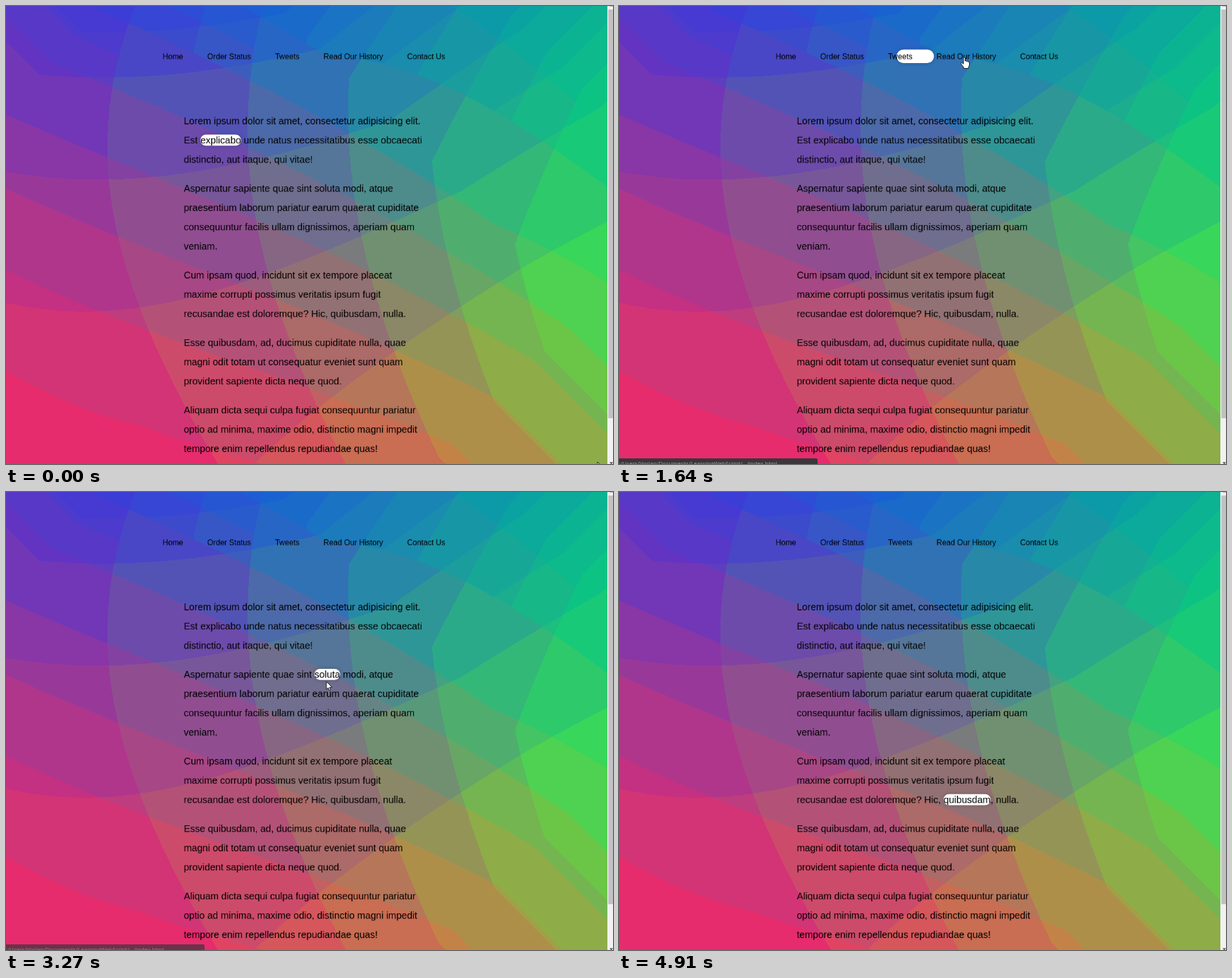
An HTML page with a canvas that plays this animation: 862x650 px, repeating every 5.16 s.

```html
<!DOCTYPE html>
<html lang="en">
<head>
<meta charset="utf-8">
<title>Follow along links</title>
<style>
html, body { margin: 0; width: 100%; height: 100%; overflow: hidden; }
canvas { display: block; }
</style>
</head>
<body>
<canvas id="stage" width="862" height="650"></canvas>
<script>
const ctx = document.getElementById('stage').getContext('2d');
const LOOP = 5160;
const VIEW_W = 854, VIEW_H = 650;
const ZOOM = 0.684;
const ORIGIN = { x: -7.6, y: -6.6 };       // page corner on the stage
const PAGE_W = 1260, PAGE_H = 1061;        // in page pixels
const MIDDLE = 629.7;
const FAMILY = '"Liberation Sans", Arial, sans-serif';
const STATUS = ':/Users/Vorlan/Documents/LearningWebScript/.../index.html';

const NAV = ['Home', 'Order Status', 'Tweets', 'Read Our History', 'Contact Us'];
// Square brackets mark links.
const PARAGRAPHS = [
  ['Lorem ipsum dolor sit amet, [consectetur] adipisicing elit.',
   'Est [explicabo] unde natus necessitatibus esse obcaecati',
   'distinctio, aut itaque, qui vitae!'],
  ['Aspernatur sapiente quae sint [soluta] modi, atque',
   'praesentium laborum pariatur earum [quaerat] cupiditate',
   'consequuntur facilis ullam dignissimos, aperiam quam',
   'veniam.'],
  ['Cum ipsam quod, incidunt sit ex [tempore] placeat',
   'maxime corrupti possimus veritatis ipsum fugit',
   'recusandae est doloremque? Hic, [quibusdam], nulla.'],
  ['Esse quibusdam, ad, ducimus cupiditate nulla, quae',
   'magni odit totam ut consequatur eveniet sunt quam',
   'provident sapiente dicta neque quod.'],
  ['Aliquam dicta sequi culpa fugiat [consequuntur] pariatur',
   'optio ad minima, maxime odio, distinctio magni impedit',
   'tempore enim repellendus repudiandae quas!']
];

// Pointer moves: start, end, x, y
const MOVES = [
  [30, 530, 262, 101], [610, 760, 238, 76], [850, 1180, 318, 73],
  [1230, 1480, 400, 73], [1557, 1657, 497, 73], [1740, 2220, 500, 79],
  [2270, 2400, 470, 160], [2420, 2650, 309, 196], [2810, 3080, 455, 260],
  [3200, 3270, 455, 269], [3570, 3690, 495, 284], [3690, 3800, 478, 380],
  [3800, 3960, 510, 434], [4410, 4910, 864, 656]
];
// Spans in which the status bar is wanted
const STATUS_SPANS = [[800, 2290], [2460, 3220], [4080, 4480]];

const clamp = v => Math.max(0, Math.min(1, v));
const mix = (a, b, k) => a + (b - a) * k;
const smooth = k => k * k * (3 - 2 * k);

function makeCanvas(w, h) {
  const c = document.createElement('canvas');
  c.width = w;
  c.height = h;
  return c;
}

const links = {};

function addLink(name, x, y, w, h) {
  links[name] = [x * ZOOM + ORIGIN.x, y * ZOOM + ORIGIN.y, w * ZOOM, h * ZOOM];
}

// Lays the page out at full size, then shrinks its text to the stage.
function makeText() {
  const page = makeCanvas(PAGE_W, PAGE_H), p = page.getContext('2d');
  p.font = '16px ' + FAMILY;
  const widths = NAV.map(s => p.measureText(s).width);
  let x = MIDDLE - (widths.reduce((a, b) => a + b) + 50 * (NAV.length - 1)) / 2;
  NAV.forEach((name, i) => {
    p.fillText(name, x, 120);
    addLink(name, x - 5, 100, widths[i] + 10, 28);
    x += widths[i] + 50;
  });

  p.font = '20px ' + FAMILY;
  const left = MIDDLE - 249.5;
  let mid = 248;
  for (const lines of PARAGRAPHS) {
    for (const line of lines) {
      const [before, link] = line.split(/[\[\]]/);
      if (link) {
        addLink(link, left + p.measureText(before).width, mid - 11.5, p.measureText(link).width, 23);
      }
      p.fillText(line.replace(/[\[\]]/g, ''), left, mid + 7);
      mid += 40;
    }
    mid += 20;
  }

  const layer = makeCanvas(VIEW_W, VIEW_H), c = layer.getContext('2d');
  c.imageSmoothingQuality = 'high';
  c.drawImage(page, ORIGIN.x, ORIGIN.y, PAGE_W * ZOOM, PAGE_H * ZOOM);
  return layer;
}

// Stacked corner gradients, reduced to colour cells that take their mean colour.
// Cells met in the top row are split once more.
function makeBackdrop() {
  const pink = [255, 26, 102], blue = [6, 67, 249], green = [13, 242, 89], amber = [249, 158, 31];
  const w = PAGE_W * ZOOM, h = PAGE_H * ZOOM, span = w + h, count = VIEW_W * VIEW_H;
  const cell = (c, bits) => c.reduce((key, v) => key << bits | v >> (8 - bits), 0);
  const keys = new Uint16Array(count), sums = [], split = new Set();
  for (let i = 0; i < count; i++) {
    const u = i % VIEW_W + 0.5 - ORIGIN.x;
    const v = Math.floor(i / VIEW_W) + 0.5 - ORIGIN.y;
    const kPink = clamp(1 - (u + h - v) / span / 0.7);
    const kBlue = clamp((0.8 - (u + v) / span) / 0.7);
    const kGreen = clamp((0.8 - (w - u + v) / span) / 0.7);
    const c = amber.map((base, n) => Math.round(
      mix(mix(mix(base, green[n], kGreen), blue[n], kBlue), pink[n], kPink)));
    const coarse = cell(c, 3);
    if (i < VIEW_W) split.add(coarse);
    const key = split.has(coarse) ? 512 + cell(c, 4) : coarse;
    const sum = sums[key] || (sums[key] = [0, 0, 0, 0]);
    keys[i] = key;
    c.forEach((value, n) => sum[n] += value);
    sum[3]++;
  }
  const img = new ImageData(VIEW_W, VIEW_H);
  for (let i = 0; i < count; i++) {
    const sum = sums[keys[i]];
    for (let n = 0; n < 3; n++) img.data[i * 4 + n] = sum[n] / sum[3];
    img.data[i * 4 + 3] = 255;
  }
  const layer = makeCanvas(VIEW_W, VIEW_H);
  layer.getContext('2d').putImageData(img, 0, 0);
  return layer;
}

// CSS "ease" curve
function ease(p) {
  if (p >= 1) return 1;
  let lo = 0, hi = 1;
  for (let i = 0; i < 20; i++) {
    const s = (lo + hi) / 2, r = 1 - s;
    if (0.75 * r * s + s * s * s < p) lo = s; else hi = s;
  }
  const s = lo, r = 1 - s;
  return 0.3 * r * r * s + 3 * r * s * s + s * s * s;
}

function pointerAt(t) {
  let x = 840, y = 647;
  for (const [start, end, toX, toY] of MOVES) {
    const k = smooth(clamp((t - start) / (end - start)));
    x = mix(x, toX, k);
    y = mix(y, toY, k);
  }
  return [x, y];
}

function linkUnder([px, py]) {
  return Object.keys(links).find(name => {
    const [x, y, w, h] = links[name];
    return px >= x && px <= x + w && py >= y && py <= y + h;
  });
}

// Follows the pointer once to learn when it enters each link.
function findHovers() {
  const hovers = [];
  let last = 'explicabo';
  for (let t = 0; t < LOOP; t++) {
    const name = linkUnder(pointerAt(t));
    if (name && name !== last) hovers.push({ t, name: last = name });
  }
  return hovers;
}

function pillAt(t) {
  let rect = links.explicabo;
  hovers.forEach((hover, i) => {
    if (t <= hover.t) return;
    const next = hovers[i + 1];
    const end = next ? Math.min(t, next.t) : t;
    const k = ease((end - hover.t) / 200);
    rect = rect.map((v, n) => mix(v, links[hover.name][n], k));
  });
  return rect;
}

function statusAt(t) {
  return Math.max(...STATUS_SPANS.map(([start, end]) =>
    Math.min(clamp((t - start) / 120), clamp(1 - (t - end) / 170))));
}

function drawPill([x, y, w, h]) {
  ctx.save();
  ctx.shadowColor = 'rgba(0,0,0,0.2)';
  ctx.shadowBlur = 10 * ZOOM;
  ctx.fillStyle = '#fff';
  ctx.beginPath();
  ctx.roundRect(x, y, w, h, Math.min(20 * ZOOM, h / 2));
  ctx.fill();
  ctx.restore();
}

function drawStatus(alpha) {
  ctx.save();
  ctx.globalAlpha = alpha;
  ctx.fillStyle = '#3a363a';
  ctx.beginPath();
  ctx.roundRect(-4, 642, 286, 14, 2);
  ctx.fill();
  ctx.fillStyle = '#a9a5a9';
  ctx.font = '8px "Open Sans", sans-serif';
  ctx.fillText(STATUS, 0, 652);
  ctx.restore();
}

function triangle(x, y, dir) {
  ctx.beginPath();
  ctx.moveTo(x - 2.6, y);
  ctx.lineTo(x + 2.6, y);
  ctx.lineTo(x, y + 2.8 * dir);
  ctx.fill();
}

function drawScrollbar() {
  ctx.fillStyle = '#f1f1f1';
  ctx.fillRect(VIEW_W, 0, 8, VIEW_H);
  ctx.fillStyle = '#c1c1c1';
  ctx.fillRect(855.3, 5, 7, 580);
  ctx.fillStyle = '#a3a3a3';
  triangle(859.6, 0.8, -1);
  ctx.fillStyle = '#505050';
  triangle(859.6, 647.5, 1);
}

const ARROW = new Path2D('M0 0V11.2L2.6 8.8L4.3 12.7L6.1 11.9L4.4 8.2H8Z');
const HAND = new Path2D('M-1.2 1Q-1.2 0 0 0Q1.2 0 1.2 1V5Q3 4.4 3.3 5.6Q4.9 5 5.3 6.2' +
  'Q7.2 5.8 7.2 7.4V10.5Q7 12.4 5.9 13.6V15.6H-1V13.8Q-3 11.6-4.8 8.7Q-4.8 7.1-3.3 7.5L-1.2 9.3Z');

function drawPointer(spot) {
  const shape = linkUnder(spot) ? HAND : ARROW;
  ctx.save();
  ctx.translate(...spot);
  ctx.fillStyle = '#fff';
  ctx.fill(shape);
  ctx.strokeStyle = '#111';
  ctx.lineWidth = 0.9;
  ctx.lineJoin = 'round';
  ctx.stroke(shape);
  ctx.restore();
}

const text = makeText();
const backdrop = makeBackdrop();
const hovers = findHovers();
const begin = performance.now();

function draw() {
  const t = (performance.now() - begin) % LOOP;
  ctx.drawImage(backdrop, 0, 0);
  drawPill(pillAt(t));
  ctx.drawImage(text, 0, 0);
  drawStatus(statusAt(t));
  drawScrollbar();
  drawPointer(pointerAt(t));
  requestAnimationFrame(draw);
}
draw();
</script>
</body>
</html>
```
